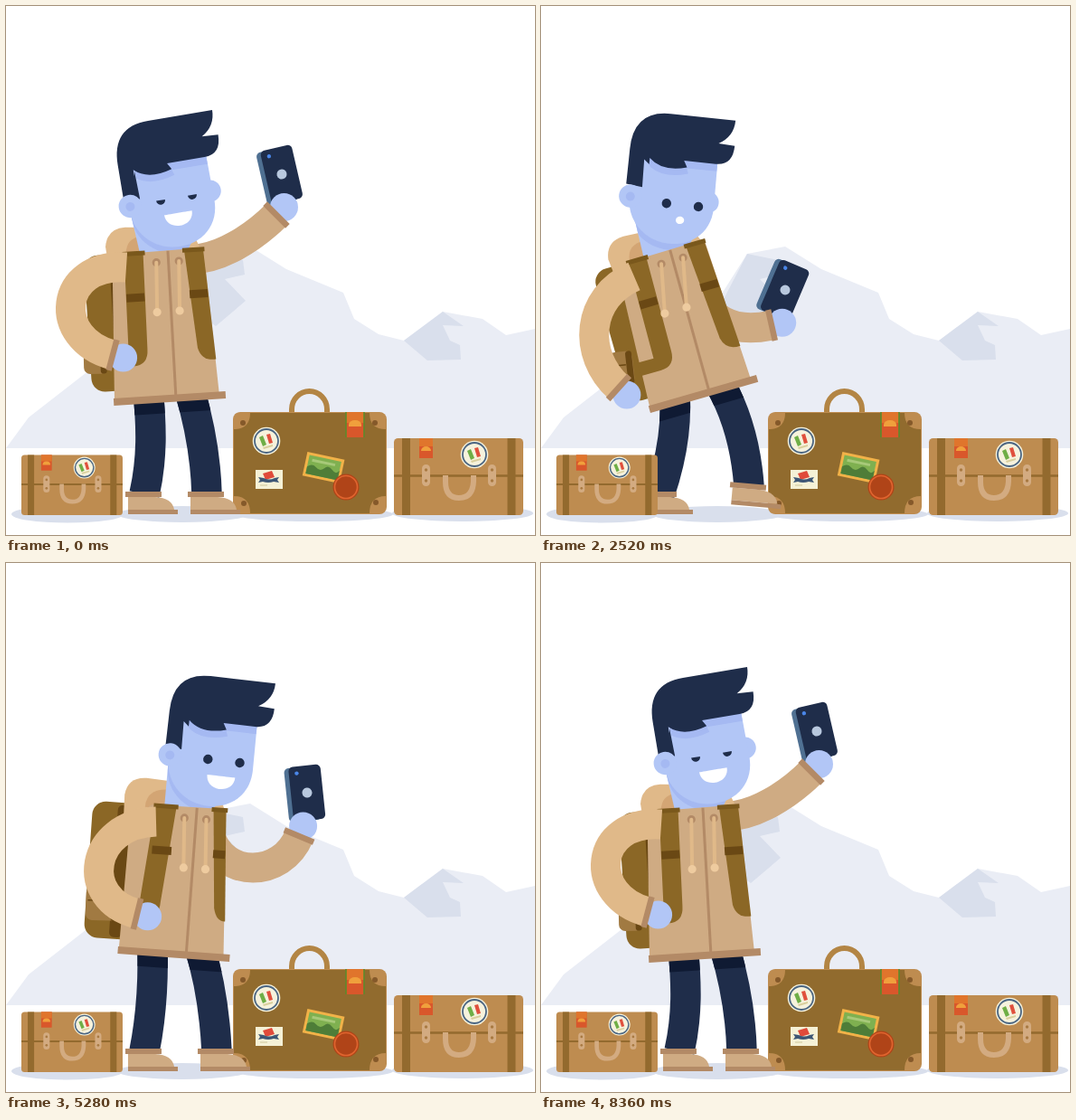
Write an HTML page that moves like this. It is 585 px wide and 585 px high and loops after 8400 ms.

```html
<!DOCTYPE html>
<html lang="en">
<head>
<meta charset="utf-8">
<title>Traveller</title>
<style>
html, body { margin: 0; width: 100%; height: 100%; overflow: hidden; background: #fff; }
svg { display: block; width: 100%; height: 100%; }
</style>
</head>
<body>
<svg viewBox="0 0 585 585" fill="none">
  <defs>
    <g id="sticker">
      <circle r="15.3" fill="#f6f2dc"/>
      <circle r="13" stroke="#4a6582" stroke-width="1.8"/>
      <path d="M-8-4l4-2 4 10-4 2z" fill="#6fae46"/>
      <path d="M0-7l4-1 3 10-4 1z" fill="#e0503c"/>
      <path d="M-4 7l11-3v2l-10 3z" fill="#d9cf9c"/>
    </g>
    <g id="case">
      <rect width="143" height="85" rx="4.5" fill="#be8c50"/>
      <path d="M0 41.5H143" stroke="#936a2e" stroke-width="2.5"/>
      <path d="M13.5 0V85M130 0V85" stroke="#936a2e" stroke-width="9"/>
      <path d="M28 0h15v22h-15z" fill="#d9572b"/>
      <path d="M28 0h15v9h-15z" fill="#e0752c"/>
      <path d="M30 14a5.5 5 0 0 1 11 0z" fill="#f0a03c"/>
      <use href="#sticker" x="89" y="18"/>
      <g fill="#d3ab81">
        <rect x="31" y="29" width="9" height="24" rx="4.5"/>
        <rect x="104" y="29" width="9" height="24" rx="4.5"/>
      </g>
      <g fill="#a97a42">
        <circle cx="35.5" cy="35" r="1.7"/><circle cx="35.5" cy="47" r="1.7"/>
        <circle cx="108.5" cy="35" r="1.7"/><circle cx="108.5" cy="47" r="1.7"/>
      </g>
      <path d="M57 41V48Q57 66 72 66T88 48V41" stroke="#d3ab81" stroke-width="6"/>
    </g>
  </defs>

  <path d="M0 489L25 455 97 399 200 318 228 274 270 266 310 291 373 317 385 346 412 363 440 370 483 338 527 346 553 364 585 357V489z" fill="#eaedf5"/>
  <g fill="#d9dfec">
    <path d="M228 274L262 281 264 297 242 302 265 326 232 354 199 330z"/>
    <path d="M440 370L483 338 506 354 483 353 491 370 502 375 503 391 466 392z"/>
    <ellipse cx="68" cy="562" rx="62" ry="9.5"/>
    <ellipse cx="195" cy="562" rx="72" ry="9"/>
    <ellipse cx="340" cy="562" rx="88" ry="8"/>
    <ellipse cx="505" cy="561" rx="78" ry="9"/>
  </g>

  <path d="M316 452V446a19.5 20 0 0 1 39 0V452" stroke="#b38544" stroke-width="6"/>
  <rect x="251" y="449" width="170" height="113" rx="8" fill="#be8c50"/>
  <path d="M270 450H402Q402 468 420 468V542Q402 542 402 561H270Q270 542 252 542V468Q270 468 270 450z" fill="#916b2e"/>
  <g fill="#85592a">
    <circle cx="262" cy="461" r="3"/><circle cx="408" cy="461" r="3"/>
    <circle cx="263" cy="550" r="3"/><circle cx="409" cy="549" r="3"/>
  </g>
  <use href="#sticker" x="288" y="481"/>
  <path d="M376 449h20v28h-20z" fill="#d9572b"/>
  <path d="M376 449h20v12h-20z" fill="#e0752c"/>
  <path d="M379 465h14v-2a7 5 0 0 0-14 0z" fill="#f0a03c"/>
  <path d="M376 449v28M396 449v28" stroke="#5d8a2c" stroke-width="1.6"/>
  <g transform="translate(351 511) rotate(12)">
    <path d="M-21-14h42v27h-42z" fill="#f2b248"/>
    <path d="M-18-11h36v21h-36z" fill="#7fb050"/>
    <path d="M-18 10V2q5-5 10-1t9-1 9 0 8-1V10z" fill="#4e7d38"/>
    <path d="M-14-6h26" stroke="#a7c979" stroke-width="3"/>
  </g>
  <circle cx="376" cy="532" r="14.5" fill="#b04418"/>
  <circle cx="376" cy="532" r="12.5" stroke="#e0652f" stroke-width="1.6"/>
  <path d="M276 513h30v21h-30z" fill="#f5f1d6"/>
  <path d="M284 517l10-3 3 7-10 3z" fill="#e04a3a"/>
  <path d="M279 521l6 1q6 3 12 0l5-1-2 3 2 3-6-1q-6 2-12 0l-5 1 2-3z" fill="#3d5675"/>
  <path d="M281 530h8" stroke="#cfc79a"/>
  <use href="#case" transform="translate(429 478)"/>
  <g id="man"></g>
  <use href="#case" transform="translate(17 496.5) scale(.783)"/>
</svg>
<script>
const SKIN = '#b2c6f6', SHADE = '#a5b9f2', NAVY = '#1f2d4a', COAT = '#cfab83', SLEEVE = '#e0b989',
  TRIM = '#b38a66', STRAP = '#8b6726', DARK = '#6a4814';

// torso: x, y, angle, turn, pack shift; head: x, y, angle; face: eye x, eye y, far ear x, surprise
// arms: shoulder, two handles, wrist; legs: hip, two handles; feet and phone: x, y, angle
const proud = {
  torso: [181, 434, -3.7, 0, -4], head: [193.7, 213, -9.5], face: [-5, -2, 33, 0],
  near: [133, 289, 58, 284, 50, 368, 118, 386], far: [205, 280, 235, 280, 272, 258, 299, 231], phone: [305, 186, -13],
  legL: [157, 425, 161, 465, 162, 500], footL: [153, 540, 0],
  legR: [203, 425, 214, 462, 221, 502], footR: [222, 540, 0]
};
const reach = {
  torso: [222, 436, 8, .8, -15], head: [280, 223, 10], face: [2, 3, 20, 1],
  near: [192, 284, 132, 300, 122, 372, 172, 396], far: [250, 300, 290, 338, 372, 330, 403, 277], phone: [417, 231, 14],
  legL: [194, 425, 188, 465, 172, 505], footL: [153, 540, 0],
  legR: [248, 425, 268, 460, 281, 500], footR: [285, 542, 2]
};
const check = {
  torso: [196.5, 436, 4.7, 1, -13], head: [249.5, 220, 13.2], face: [-1, 4.3, 20, 1],
  near: [164, 258, 170, 340, 235, 350, 279, 303], far: [230, 300, 235, 345, 285, 345, 300, 303], phone: [310, 257, 14],
  legL: [171, 425, 171, 465, 165, 505], footL: [154, 540, 0],
  legR: [226, 425, 237, 460, 242, 500], footR: [244, 540, 0]
};
const lower = {
  torso: [179.5, 429, -16, 0, 0], head: [156, 212, 6], face: [1.3, 8, 29, 1],
  near: [103, 299, 50, 322, 45, 385, 86, 422], far: [170, 300, 180, 350, 215, 362, 255, 353], phone: [270, 314, 23],
  legL: [148, 430, 150, 465, 143, 505], footL: [131, 540, 0],
  legR: [198, 418, 216, 450, 227, 490], footR: [230, 531, 5]
};
const cheer = {
  ...lower, torso: [179, 428.5, -16.5, 0, 0], head: [142, 207.6, -20], face: [0, -6, 31, 0],
  near: [102, 300, 49, 318, 35, 385, 73, 424], far: [175, 278, 235, 282, 269, 245, 279, 212], phone: [273, 162.5, -28],
  legR: [190, 418, 233, 424, 264, 450], footR: [244, 506, 16]
};
const raise = {
  ...cheer, head: [144, 209, -14], near: [102, 300, 48, 319, 34, 385, 72, 425],
  far: [175, 280, 225, 270, 268, 190, 283, 113], phone: [304, 55, 14],
  legR: [194, 418, 224, 432, 248, 465], footR: [239, 516, 11]
};
const ready = {
  ...cheer, torso: [177, 428.5, -12.7, 0, 0], head: [159, 207, -13], face: [1.6, -5, 27, 0],
  near: [103, 296, 49, 313, 38, 380, 75, 416], far: [180, 285, 235, 310, 274, 280, 280, 241], phone: [276.5, 190.5, -23],
  legL: [145, 430, 147, 465, 143, 505], legR: [188, 424, 231, 428, 259, 453], footR: [243, 511, 12]
};
const smile = {
  torso: [185.5, 432.5, 4.1, .75, -20], head: [238, 218, 6.5], face: [3, .7, 20, 0],
  near: [166, 286, 92, 288, 80, 372, 145, 388], far: [225, 300, 240, 350, 305, 348, 324, 302], phone: [333, 254, -6],
  legL: [162, 425, 163, 465, 160, 505], footL: [153, 540, 0],
  legR: [214, 425, 225, 460, 231, 500], footR: [233, 540, 0]
};

const LOOP = 8400;
const keys = [[0, proud], [120, proud], [820, reach], [980, reach], [1560, check], [1800, check], [2520, lower],
  [3080, raise], [3540, cheer], [4420, cheer], [4800, ready], [5260, smile], [6220, smile], [7100, proud], [LOOP, proud]];

// Monotone cubic interpolation, so holds stay still and nothing overshoots.
function poseAt(time) {
  const i = Math.max(0, keys.findIndex(([t]) => t > time) - 1);
  const slope = (part, n, k) => k < 0 || k > keys.length - 2 ? 0 :
    (keys[k + 1][1][part][n] - keys[k][1][part][n]) / (keys[k + 1][0] - keys[k][0]);
  const tangent = (part, n, k) => {
    const a = slope(part, n, k - 1), b = slope(part, n, k);
    return a * b <= 0 ? 0 : 2 * a * b / (a + b);
  };
  const [t0, from] = keys[i], [t1, to] = keys[i + 1], span = t1 - t0, s = (time - t0) / span;
  const ease = s * s * (3 - 2 * s), pose = {};
  for (const part in from) pose[part] = from[part].map((v, n) => v + (to[part][n] - v) * ease +
    span * s * (1 - s) * ((1 - s) * tangent(part, n, i) - s * tangent(part, n, i + 1)));
  return pose;
}

const fill = (d, color, more = '') => `<path d="${d}" fill="${color}" ${more}/>`;
const line = (d, color, width, more = '') => `<path d="${d}" stroke="${color}" stroke-width="${width}" ${more}/>`;
const dot = (x, y, r, color) => `<circle cx="${x}" cy="${y}" r="${r}" fill="${color}"/>`;
const box = (x, y, w, h, r, color) => `<rect x="${x}" y="${y}" width="${w}" height="${h}" rx="${r}" fill="${color}"/>`;
const at = ([x, y, a]) => `transform="translate(${x} ${y}) rotate(${a})"`;
const group = (frame, body) => `<g ${at(frame)}>${body}</g>`;
const curve = p => `M${p[0]} ${p[1]}C${p.slice(2)}`;
const place = ([x, y, a], u, v) => {
  const c = Math.cos(a * Math.PI / 180), s = Math.sin(a * Math.PI / 180);
  return `${x + u * c - v * s} ${y + u * s + v * c}`;
};

function arm(p, color) {
  const [cx, cy, x, y] = p.slice(4), len = Math.hypot(x - cx, y - cy);
  const dx = (x - cx) / len, dy = (y - cy) / len;
  return dot(x + dx * 12, y + dy * 12, 15.5, SKIN) + line(curve(p), color, 33) +
    line(`M${x - dy * 17.5} ${y + dx * 17.5}L${x + dy * 17.5} ${y - dx * 17.5}`, TRIM, 6.5);
}

const phone = frame => group(frame,
  box(-23, -29, 36, 60, 5, '#4f7092') + box(-18, -30, 35.5, 60.5, 5, NAVY) +
  dot(0, 0, 5.5, '#b8c8de') + dot(-9.3, -22.5, 2.2, '#4a86e8'));

const shoe = frame => group(frame,
  fill('M-18 3H12Q31 4 33 17H-18z', COAT) + fill('M-21-3H19V3H-21zM-18 17H37V22H-18z', TRIM));

function legs(p) {
  const paths = [p.legL.concat(p.footL.slice(0, 2)), p.legR.concat(p.footR.slice(0, 2))].map(curve).join('');
  return line(paths, NAVY, 33.5) +
    `<clipPath id="hip"><rect x="-70" y="-30" width="140" height="46" ${at(p.torso)}/></clipPath>` +
    line(paths, '#0f1a33', 33.5, 'clip-path="url(#hip)"') + shoe(p.footL) + shoe(p.footR);
}

function pack(angle, turn, shift) {
  const width = 26 + 12 * turn;
  return `<g transform="translate(${shift} 0)">` +
    box(-81, -163, 60, 151, 15, STRAP) + box(-53, -160, 14, 146, 5, DARK) + '</g>' +
    group([-70, -51, -.6 * angle], box(4 - width, -18, width, 37, 7, '#a17a42') +
      box(-3.5, -18, 7, 37, 3.5, DARK) + line(`M${6 - width}-3h16`, DARK, 1.5));
}

const hood = t => fill(`M${-57 - 12 * t}-140L${-60 - 9 * t}-172Q${-57 - 10 * t}-192 ${-37 - 9 * t}-192L-8-190V-140z`, SLEEVE) +
  fill(`M${-38 - 7 * t}-160Q${-38 - 7 * t}-180 -20-181H0V-160z`, '#d3a574') +
  fill('M18-160L38-179 46-160z', SLEEVE);

function coat(angle, t) {
  const leftTop = -40 + 11 * t, rightTop = 26.5 + 8 * t, edge = -21 + 3 * t;
  const band = (x, w) => fill(`M${x}-118h${w}v9h${-w}z`, DARK);
  const string = u => `<g transform="translate(${u} -151) rotate(${-.75 * angle})">` +
    dot(0, 0, 4.6, TRIM) + line('M0 0V54', SLEEVE, 4, 'stroke-linecap="round"') + dot(0, 55, 4.6, '#eecb9f') + '</g>';
  return fill(`M${-54 - 6 * t}-145L-36-163 ${48 - 2 * t}-164 55-2H-61z`, COAT) +
    line(`M${8.5 + 7.5 * t}-163L${7 + 9 * t}-3`, TRIM, 3) +
    fill('M-62-4H62V4H-62z', TRIM) +
    fill(`M${leftTop}-163H${-19 + 14 * t}L${edge}-56Q${edge}-38 -38-38H-61V-53H-42z`, STRAP) +
    fill(`M${rightTop}-163H${47.5 - 1.5 * t}L54-40Q${38 + 8 * t}-39 ${34.5 + 8.5 * t}-54z`, STRAP) +
    band(leftTop - .5, 20 + 2 * t) + band(rightTop + 3, 20 - 9 * t) +
    fill(`M${leftTop - 2}-165H${-17 + 14 * t}v5H${leftTop - 2}zM${rightTop - 2}-165H${49 - t}v5H${rightTop - 2}z`, '#7a581c') +
    string(-5 + 8 * t) + string(20 + 7 * t);
}

const FACE = 'M35-45L36 8C36 34 17 52-9 52C-38 52-58 30-58 5L-48-45z';

// The fringe slides along the forehead as the face tips up.
const hair = k => `M-63-9V-48Q-63-91-22-91H50Q50-73 34-64L52-63Q52-41 33-41H${k - 2}L${k + 2}-34` +
  `Q${k - 25}-26 ${k - 40}-40V-33L-46-38-45-7z`;
const fringe = k => `M-46-40L${k - 38}-30Q${k - 22}-19 ${k + 4}-27L${k + 2}-33H35V-45H-46z`;

function neck(torso, head) {
  const d = `M${place(torso, -22, -159)}L${place(torso, 30, -162)} ${place(head, 25, 20)} ${place(head, -58, 5)}z`;
  return `<clipPath id="neck"><path d="${d}"/></clipPath>` + fill(d, SKIN) +
    `<g clip-path="url(#neck)">${group(head, fill(FACE, SHADE, 'transform="translate(0 7)"'))}</g>`;
}

function eye(x, y, mood) {
  if (mood === 'sly') return fill(`M${x - 5} ${y}h10a5 5 0 0 1-10 0z`, NAVY);
  if (mood === 'happy') return line(`M${x - 5} ${y + 3}a5 5.5 0 0 1 10 0`, NAVY, 2.4, 'stroke-linecap="round"');
  return dot(x, y, 5.2, NAVY);
}

function head(frame, [ex, ey, ear, surprise], mood) {
  const mix = (a, b) => a + (b - a) * surprise, slide = Math.min(0, ex + ey);
  const w = mix(15.5, 4.6), bulge = mix(0, 5.6), depth = mix(19, 5.6);
  return group(frame,
    dot(ear, -2 + ey / 2, 12, SKIN) + fill(FACE, SKIN) +
    fill(fringe(slide), SHADE) + fill(hair(slide), NAVY) +
    dot(-57, ey / 2, 12.7, SKIN) + dot(-57, ey / 2 + .5, 5, SHADE) +
    eye(ex - 17.7, ey, mood) + eye(ex + 17.7, ey, mood) +
    `<g transform="translate(${ex - 1} ${ey + 17})">` +
    fill(`M${-w} 0C${-w} ${-bulge} ${w} ${-bulge} ${w} 0C${w} ${depth} ${-w} ${depth} ${-w} 0z`, '#fff') + '</g>');
}

const moodAt = t => t < 200 || t > 6700 ? 'sly' : t > 2950 && t < 5000 ? 'happy' : 'open';
const man = document.getElementById('man');

function draw(time) {
  const p = poseAt(time), [, , angle, turn, shift] = p.torso;
  man.innerHTML = group(p.torso, pack(angle, turn, shift)) + phone(p.phone) + arm(p.far, COAT) + legs(p) +
    group(p.torso, hood(turn)) + neck(p.torso, p.head) + group(p.torso, coat(angle, turn)) +
    head(p.head, p.face, moodAt(time)) + arm(p.near, SLEEVE);
}

const start = performance.now();
function tick() {
  draw((performance.now() - start) % LOOP);
  requestAnimationFrame(tick);
}
tick();
</script>
</body>
</html>
```
